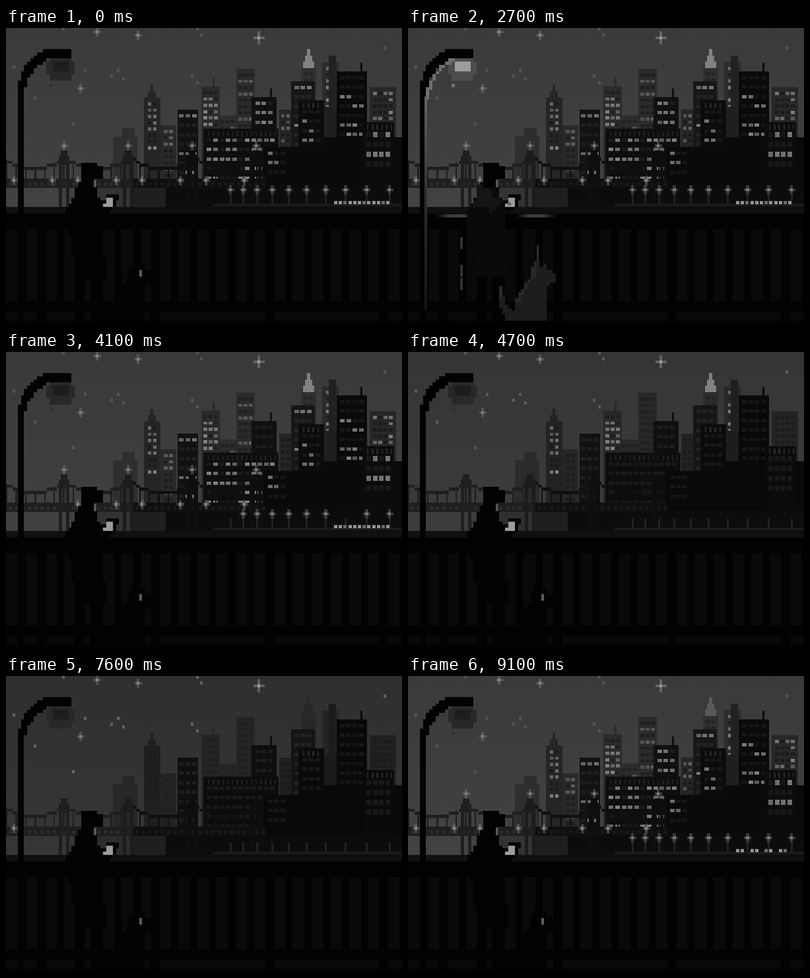
An HTML page with a canvas for the animation above (9200 ms loop, 600x450 px).

```html
<!DOCTYPE html>
<html lang="en">
<head>
<meta charset="utf-8">
<title>Night skyline</title>
<style>
html, body { margin: 0; width: 100%; height: 100%; overflow: hidden; background: #000; }
canvas { display: block; width: 600px; height: 450px; }
</style>
</head>
<body>
<canvas id="stage" width="600" height="450"></canvas>
<script>
const LOOP = 9200, STEP = 100, CELL = 4.8;
const ctx = document.getElementById('stage').getContext('2d');
const clamp = v => Math.max(0, Math.min(1, v));
const mix = (a, b, k) => a + (b - a) * k;
const range = n => [...Array(n).keys()];
const noise = (a, b = 0, c = 0) => {
  const v = Math.sin(a * 127.1 + b * 311.7 + c * 74.7) * 43758.5453;
  return v - Math.floor(v);
};
// Neutral tone with the slight violet cast of the scene
const tone = (v, alpha = 1) => `rgba(${v + 1},${v},${v + 2},${alpha})`;
const isLit = (t, off, on) => t < off || t >= on;

function rect(fill, x, y, w, h) {
  const left = Math.round(x), top = Math.round(y);
  ctx.fillStyle = fill;
  ctx.fillRect(left, top, Math.round(x + w) - left, Math.round(y + h) - top);
}
function gradient(x1, y1, x2, y2, ...fills) {
  const grad = ctx.createLinearGradient(x1, y1, x2, y2);
  fills.forEach((fill, i) => grad.addColorStop(i / (fills.length - 1), fill));
  return grad;
}
function sparkle(x, y, bright, rx = 5.5, ry = 7) {
  rect(tone(bright, .42), x - rx, y - 2.4, rx * 2, CELL);
  rect(tone(bright, .42), x - 2.4, y - ry, CELL, ry * 2);
  rect(tone(bright), x - 2.4, y - 2.4, CELL, CELL);
}
// Turns a smooth outline into whole cells of the pixel grid
function blocky(outline) {
  const smooth = new Path2D(outline), cells = new Path2D();
  for (let y = -1.6; y < 450; y += CELL)
    for (let x = -1.4; x < 600; x += CELL)
      if (ctx.isPointInPath(smooth, x + CELL / 2, y + CELL / 2)) {
        const left = Math.round(x), top = Math.round(y);
        cells.rect(left, top, Math.round(x + CELL) - left, Math.round(y + CELL) - top);
      }
  return cells;
}
function paint(fill, cells) {
  ctx.fillStyle = fill;
  ctx.fill(cells);
}

const art = {
  lamp: blocky('M18 450V95C20 70 38 32 66 32H97V46H72C52 47 28 78 28 100V450Z'),
  lampEdge: blocky('M27 108C27 80 50 50 68 46L72 50C55 54 32 82 32 108Z'),
  halo: blocky('M65 47H99L103 56V70L97 80H70L62 70V56Z'),
  bulb: blocky('M71 51H93V66H71Z'),
  hat: blocky('M113 206H137V211H146V229H134V243H116V229H113Z'),
  coat: blocky('M109 236H138V256L146 266L157 271V283H147V340L151 350V381H102V352L98 318L92 305V272L104 256V241H109Z'),
  shoulder: blocky('M106 240H122L128 254L142 262L136 272L124 283V270L99 274L104 256Z'),
  legs: blocky('M104 380H118V446H104ZM130 380H147V446H130Z'),
  phone: blocky('M154 253H169V262L160 277H147V266Z'),
  screen: blocky('M155 258H165L159 272H147Z'),
  dog: blocky('M193 354H198V361L204 365V360H212V368L222 372V386L208 392V445H150L141 430L137 415V390H142L147 415L158 433L166 412L174 395L187 378V364Z'),
  dogBack: blocky('M193 354H198L193 378L180 393L166 420L162 414L174 395L187 378V364ZM137 390H142V413H137Z')
};

// x, top, width and shade of each tower, far to near
const towers = [
  { x: 162, y: 165, w: 37, shade: 45, blank: true },
  { x: 176, y: 152, w: 19, shade: 45, blank: true },
  { x: 209, y: 106, w: 25, shade: 36, late: 4900, spire: 86 },
  { x: 234, y: 148, w: 24, shade: 40, dim: true },
  { x: 322, y: 133, w: 50, shade: 44, dim: true },
  { x: 296, y: 89, w: 28, shade: 42, late: 5100, mast: 314 },
  { x: 349, y: 62, w: 28, shade: 42, dim: true },
  { x: 414, y: 124, w: 19, shade: 36, dim: true },
  { x: 447, y: 60, w: 23, shade: 46, late: 5300, spire: 32 },
  { x: 479, y: 52, w: 25, shade: 42, late: 5200 },
  { x: 489, y: 42, w: 11, shade: 32, blank: true },
  { x: 551, y: 90, w: 40, shade: 38 },
  { x: 482, y: 120, w: 19, shade: 30, blank: true },
  { x: 260, y: 124, w: 31, shade: 17 },
  { x: 372, y: 105, w: 38, shade: 15, mast: 401 },
  { x: 432, y: 81, w: 36, shade: 22 },
  { x: 299, y: 153, w: 114, shade: 13, comb: 29 },
  { x: 501, y: 66, w: 46, shade: 9, mast: 538 },
  { x: 443, y: 110, w: 39, shade: 11, comb: 38 },
  { x: 482, y: 166, w: 118, shade: 9, blank: true },
  { x: 540, y: 143, w: 48, shade: 11, comb: 38, big: true },
  { x: 391, y: 181, w: 150, shade: 9, blank: true },
  { x: 391, y: 181, w: 38, shade: 9 }
];
const GROUND = 242;

function spire(cx, top, fill) {
  for (const k of range(3)) {
    const w = CELL + k * 6.5;
    rect(fill, cx - w / 2, top + k * 9.6, w, 9.6);
  }
}
function windows(tower, seed, lit) {
  const { x, y, w, shade, dim, big, comb } = tower;
  const far = shade > 25, dx = far ? 8 : 9.6, dy = big ? 15 : far ? 9.6 : 14.4;
  const cols = Math.floor((w - 2) / dx), left = x + (w - cols * dx) / 2 + 1.2;
  const top = y + (comb ? 15 : 7);
  const bottom = big ? 214 : y > 120 ? 230 : 182;
  const unlit = tone(far ? shade - 11 : shade + 12);
  for (let row = 0; top + row * dy < bottom; row++) {
    const bright = noise(seed, row) > .35;
    for (const col of range(cols)) {
      const v = noise(seed, row, col + 1);
      const on = lit && bright && v > .3;
      const glow = tone(mix(70, dim ? 95 : 130, v));
      rect(on ? glow : unlit, left + col * dx, top + row * dy, dx - 2.6, big ? 8 : 4.8);
    }
  }
}
function skyline(t, glow) {
  towers.forEach((tower, i) => {
    const { x, y, w, shade, mast, comb } = tower;
    const fill = tone(mix(shade * .85, shade, glow));
    const off = tower.late || 4100 + i % 7 * STEP;
    const on = tower.late ? tower.late + 3700 : 7800 + i % 6 * STEP;
    rect(fill, x, y, w, GROUND - y);
    if (mast) rect(fill, mast - 1, y - 13, 3, 13);
    if (tower.spire) spire(x + w / 2 - .5, tower.spire, fill);
    if (!tower.blank) windows(tower, i + 4, isLit(t, off, on));
    if (comb) for (let c = x + 7; c < x + w - 4; c += 7.2) rect(tone(comb), c, y + 4, 2.4, 8);
  });
  const spireGlow = t < 5400 ? 128 : t < 5500 || t >= 9000 ? 88 : 0;
  if (spireGlow) spire(458.5, 32, tone(spireGlow));
}

const starDots = [[87, 1], [290, 1], [296, 10], [574, 30], [282, 73], [290, 83], [12, 59],
  [120, 64], [160, 73], [170, 64], [178, 77], [44, 106], [102, 145]];
function sky(glow) {
  rect(gradient(0, 0, 0, 272, tone(mix(46, 57, glow)), tone(mix(53, 65, glow))), 0, 0, 600, 275);
  for (const [x, y] of starDots) rect(tone(mix(98, 82, glow)), x - 2, y - 2, 4, CELL);
  sparkle(383, 15, 160, 8.5, 10);
  sparkle(138, 6, 130);
  sparkle(200, 11, 130);
  sparkle(113, 92, 125);
}

const SPAN = 97, PIER = 88;
function bridge() {
  rect(tone(30, .4), 105, 243, 86, 30);
  rect(tone(30), 191, 243, 51, 30);
  rect(tone(11), 242, 241, 358, 32);
  for (const i of range(81)) {
    const x = i * CELL, d = ((x - PIER + SPAN * 10) % SPAN) / SPAN;
    const y = 212 - 19 * Math.abs(d * 2 - 1) ** 2.2, fill = tone(x > 190 ? 15 : 30);
    rect(fill, x, Math.round(y / CELL) * CELL, CELL, CELL);
    if (i % 3 === 0) rect(fill, x, y, 2.4, 232 - y);
  }
  rect(tone(29), 0, 229, 192, 14);
  rect(tone(14), 190, 229, 202, 14);
  for (let x = 4; x < 390; x += 9.6) rect(tone(x < 192 ? 44 : 24), x, 235, CELL, CELL);
  for (const k of range(4)) {
    const x = PIER + SPAN * k, fill = tone(k < 2 ? 30 - k * 3 : 13);
    rect(fill, x - 5, 186, 10, 9);
    rect(fill, x - 8, 194, 16, 14);
    for (const side of [-8, 3]) rect(fill, x + side, 207, 5, 65);
  }
  rect(tone(15), 0, 272, 600, 12);
  rect(tone(25), 313, 267, 287, 4);
}
function streetLights(t) {
  for (const i of range(8)) {
    const x = PIER + SPAN * Math.floor((i - 1) / 2) + (i % 2 ? -18 : 21);
    if (isLit(t, 4000 + i * STEP, i ? 7800 + i % 6 * STEP : 7600)) sparkle(x, 231.5, 130);
  }
  for (const i of range(4))
    if (isLit(t, 4200 + i * STEP, 7900 + i * STEP)) sparkle(PIER + SPAN * i, 179, 125);
  // Shore lamps spread out towards the viewer
  for (const i of range(10)) {
    const x = 340 + 18.5 * i + .92 * i * i;
    rect(tone(32), x - 1.5, 253, 3, 15);
    if (isLit(t, 4100 + i % 7 * STEP, 7800 + i % 6 * STEP)) sparkle(x, 246, 120);
  }
  for (const i of range(12))
    if (isLit(t, 4700, 9000 + i % 3 * STEP)) rect(tone(i % 4 === 2 ? 105 : 145), 497 + i * 7.2, 263, 5, CELL);
}

function fence(lit) {
  rect(tone(1), 0, 282, 600, 168);
  rect(tone(8), 0, 306, 600, 110);
  rect(tone(7), 0, 431, 600, 14);
  for (const i of range(21)) {
    const big = i % 6 === 1, w = big ? 14 : 11;
    rect(tone(1), 25.2 + i * 28.8 - w / 2, 300, w, big ? 150 : 120);
  }
  const clear = tone(60, 0), shine = tone(60, lit);
  for (const x of [42, 163]) rect(gradient(x, 0, x + 62, 0, clear, shine, shine, clear), x, 283, 62, 5);
  for (const y of [318, 360, 380]) rect(tone(48, lit), 79, y, 4, 18);
  rect(tone(48, lit), 195, 330, 3, 24);
}

function lamp(t, lit) {
  paint(tone(1), art.lamp);
  paint(tone(mix(39, 76, lit)), art.halo);
  paint(tone(mix(28, 155, lit)), art.bulb);
  paint(tone(110, lit), art.lampEdge);
  rect(gradient(0, 100, 0, 430, tone(100, lit), tone(45, lit), tone(18, lit)), 25, 104, 4, 326);
  // The moth circles the bulb while it shines
  const a = 2.7 + (lit ? Math.PI * 2 * (t - 1100) / 800 : 0);
  rect(tone(mix(48, 118, lit)), 83 + 19 * Math.cos(a), 81 + 9 * Math.sin(a), CELL, CELL);
}

function person(t, lit) {
  paint(tone(mix(1, 9, lit)), art.coat);
  paint(tone(20, lit), art.shoulder);
  paint(tone(1), art.hat);
  paint(tone(1), art.legs);
  rect(tone(85), 133, 231, 4, 11);
  paint(tone(3), art.phone);
  paint(tone(155), art.screen);
  const tapping = t >= 2100 && t <= 3000 && t / STEP % 2 === 1;
  if (tapping) rect(tone(100), 151, 265, CELL, CELL);
}

function dog(t, lit) {
  paint(tone(mix(1, 28, lit)), art.dog);
  paint(tone(39, lit), art.dogBack);
  const lid = clamp(Math.abs(t - 6400) / 200);
  rect(tone(92, (1 - lit) * lid), 201.5, 368, 4, 10);
}

function draw(t) {
  const lampLevel = clamp(t / 300) * clamp((4000 - t) / 300);
  const cityGlow = 1 - clamp((t - 4000) / 1500) + clamp((t - 7600) / 1500);
  sky(cityGlow);
  skyline(t, cityGlow);
  bridge();
  streetLights(t);
  fence(lampLevel);
  lamp(t, lampLevel);
  person(t, lampLevel);
  dog(t, lampLevel);
}

let shown = -1;
function frame(now) {
  const t = Math.floor(now % LOOP / STEP) * STEP;
  if (t !== shown) draw(shown = t);
  requestAnimationFrame(frame);
}
draw(0);
requestAnimationFrame(frame);
</script>
</body>
</html>
```
